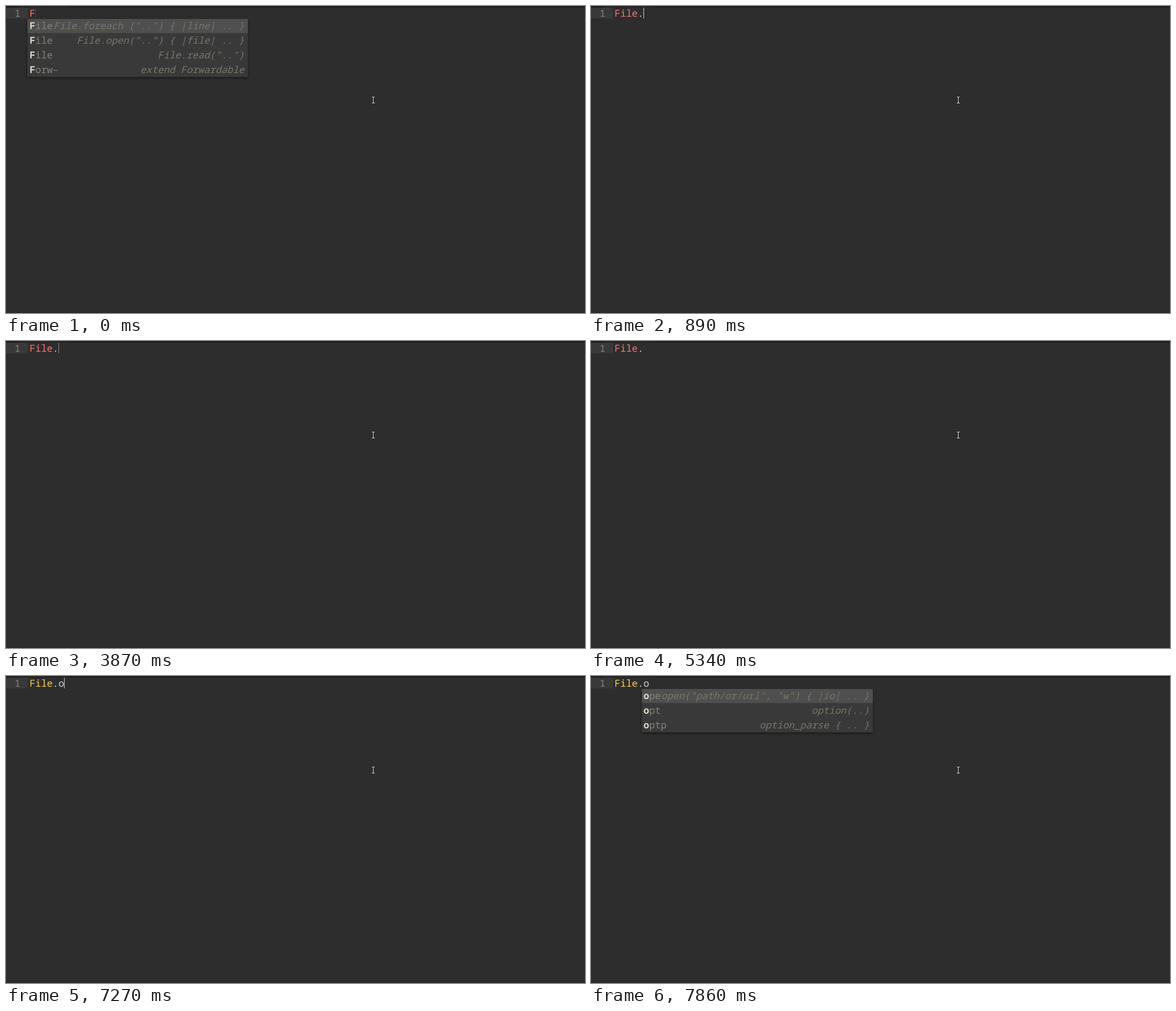
Recreate the animation shown at these times as an HTML page with a canvas. Size 1027 by 545 pixels, loop 8000 ms.

```html
<!DOCTYPE html>
<html lang="en">
<head>
<meta charset="utf-8">
<title>Editor completion</title>
<style>
  html, body { margin: 0; width: 100%; height: 100%; overflow: hidden; background: #2d2d2d; }
  canvas { display: block; width: 1027px; height: 545px; }
</style>
</head>
<body>
<canvas id="stage" width="1027" height="545"></canvas>
<script>
const ctx = document.getElementById('stage').getContext('2d');
const LOOP = 8000, TICK = LOOP / 54;
const CELL = 10.25, LEFT = 41.75, BASE = 19, ROW = 26;
const FAMILY = '17.08px "Noto Sans Mono", "DejaVu Sans Mono", monospace';
const RED = '#f97874', YELLOW = '#fccf50', FG = '#d2d2d0', DIM = '#77776a';

const fileRows = [
  ['File', 'File.foreach ("..") { |line| .. }'],
  ['File', 'File.open("..") { |file| .. }'],
  ['File', 'File.read("..")'],
  ['Forw–', 'extend Forwardable'],
];
const openRows = [
  ['ope', 'open("path/or/url", "w") { |io| .. }'],
  ['opt', 'option(..)'],
  ['optp', 'option_parse { .. }'],
];

// The tick of each key press; the first comes before the loop starts
const CODE = 'File.o';
const keys = [-3, 1, 2, 4, 6, 49];

// Steady after a key press, then a smooth blink
function caretAlpha(age) {
  if (age < 2) return 1;
  const wave = Math.cos(2 * Math.PI * (age - 1.37) / 6.63);
  return Math.min(1, Math.max(0, .1 + 1.3 * wave));
}

function rect(x, y, w, h, color) {
  ctx.fillStyle = color;
  ctx.fillRect(x, y, w, h);
}

function text(str, x, y, color, style = '') {
  ctx.font = `${style} ${FAMILY}`;
  ctx.fillStyle = color;
  ctx.fillText(str, x, y);
}

function pointer(x, y) {
  for (const [width, color] of [[2.6, '#1c1c1c'], [1.1, '#dcdcdc']]) {
    ctx.lineWidth = width;
    ctx.strokeStyle = color;
    ctx.beginPath();
    for (const up of [-1, 1]) {
      for (const side of [-2.5, 2.5]) {
        ctx.moveTo(x, y);
        ctx.lineTo(x, y + up * 4);
        ctx.quadraticCurveTo(x, y + up * 5.6, x + side, y + up * 5.6);
      }
    }
    ctx.stroke();
  }
}

function popup(rows, col, match, right) {
  const nameX = LEFT + col * CELL;
  const x = Math.floor(nameX - 3), y = 23;
  const w = right - x, h = rows.length * ROW - 1;
  ctx.save();
  ctx.shadowColor = 'rgba(0,0,0,.5)';
  ctx.shadowBlur = 4;
  ctx.shadowOffsetY = 2;
  rect(x, y, w, h, '#393939');
  ctx.restore();
  rect(x, y, w, ROW - 1, '#4f4f4f');
  rows.forEach(([name, detail], i) => {
    const base = y + 18 + i * ROW;
    text(name.slice(0, match), nameX, base, '#d8d9cc', 'bold');
    text(name.slice(match), nameX + match * CELL, base, '#84847a');
    text(detail, right - 6.2 - detail.length * CELL, base, DIM, 'italic');
  });
}

function draw(t) {
  rect(0, 0, 1027, 545, '#2d2d2d');
  rect(0, 0, 1027, 3, '#202020');
  rect(22, 0, 91, 3, '#262626');
  rect(0, 543, 1027, 2, '#292929');
  rect(0, 3, 39, 19, '#393939');
  text('1', 15.2, BASE, '#878787');

  const tick = Math.floor((t + 9) / TICK);
  const count = keys.filter(k => k <= tick).length;
  const age = tick - keys[count - 1];
  const code = CODE.slice(0, count);
  text(code.slice(0, 4), LEFT, BASE, count < 6 ? RED : YELLOW);
  text(code.slice(4), LEFT + 4 * CELL, BASE, FG);

  if (count < 5) {
    const rows = fileRows.filter(([name]) => name.startsWith(code));
    popup(rows, 0, count, 429);
  } else if (count === 6 && age > 0) {
    popup(openRows, 5, 1, 500);
  }

  ctx.globalAlpha = caretAlpha(age);
  rect(Math.round(LEFT + count * CELL), 3, 1, 19, '#d0d0d0');
  ctx.globalAlpha = 1;
  pointer(651.5, 166.9);
}

ctx.textRendering = 'geometricPrecision';
const begin = performance.now();
function frame() {
  draw((performance.now() - begin) % LOOP);
  requestAnimationFrame(frame);
}
frame();
</script>
</body>
</html>
```
